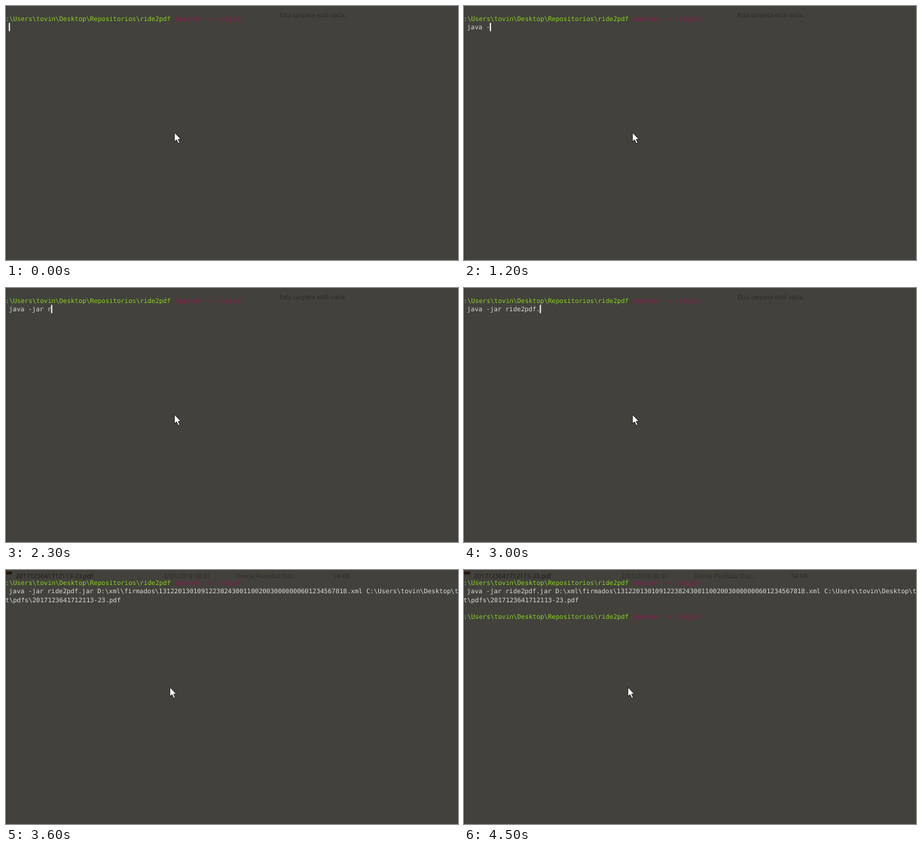
An HTML page for the animation above (4700 ms loop, 600 by 338 pixels).

```html
<!DOCTYPE html>
<html lang="es">
<head>
<meta charset="utf-8">
<style>
  html, body { margin: 0; width: 100%; height: 100%; overflow: hidden; background: #42413c; }
  svg { display: block; width: 600px; height: 338px; }
  text { white-space: pre; text-rendering: geometricPrecision; }
  .term { font: 8.47px "DejaVu Sans Mono", monospace; fill: #dcdcd6; }
  .term .path { fill: #8bd322; }
  .term .branch { fill: #8f1850; }
  .files { font: 8.25px "Open Sans", sans-serif; fill: #2b2a27; }
</style>
</head>
<body>
<svg viewBox="0 0 600 338">
  <rect width="600" height="338" fill="#42413c"/>
  <rect width="1" height="338" fill="#363530"/>
  <g class="files">
    <text id="empty" x="363" y="15.3">Esta carpeta está vacía.</text>
    <g id="row">
      <rect y="2" width="8" height="4" fill="#2a190f"/>
      <text x="13" y="10.6" fill="#1c1b19">2017123641712113-23.pdf</text>
      <text x="209" y="10.6">2/01/2018 00:31</text>
      <text x="305" y="10.6">Orena Plumdac Doc...</text>
      <text x="434" y="10.6">54 KB</text>
    </g>
  </g>
  <g class="term">
    <text id="prompt" x="-0.7" y="20"><tspan class="path">:\Users\tovin\Desktop\Repositorios\ride2pdf</tspan><tspan class="branch"> (master -> origin)</tspan></text>
    <text id="command" x="4" y="31.3"></text>
    <text id="wrapped" x="-0.7" y="42.6">t\pdfs\2017123641712113-23.pdf</text>
    <use id="nextPrompt" href="#prompt" y="45.2"/>
  </g>
  <rect id="caret" width="1.6" height="11" fill="#fff"/>
  <path id="mouse" d="M0 0V12.3L2.8 9.8L5 14.6L7.1 13.7L5 9.1H8.6Z" fill="#fff" stroke="#111" stroke-width=".8"/>
</svg>
<script>
  const LOOP = 4700, CHAR = 5.1;
  const COMMAND = "java -jar ride2pdf.jar D:\\xml\\firmados\\" +
    "1312201301091223824300110020030000000601234567818.xml C:\\Users\\tovin\\Desktop\\t";
  // [time in ms, characters typed so far]
  const TYPING = [[0, 0], [400, 1], [500, 2], [700, 3], [800, 4], [1000, 5], [1200, 6],
    [1600, 8], [1700, 9], [1900, 10], [2300, 11], [2400, 12], [2500, 13], [2700, 14],
    [3000, 19], [3200, COMMAND.length]];

  const $ = id => document.getElementById(id);
  const show = (id, on) => $(id).setAttribute("visibility", on ? "visible" : "hidden");
  const place = (id, x, y) => $(id).setAttribute("transform", `translate(${x} ${y})`);

  function draw(t) {
    const typed = TYPING.findLast(([at]) => at <= t)[1];
    const entered = t >= 3200, listed = t >= 3600, done = t >= 4000;
    $("command").textContent = COMMAND.slice(0, typed);
    show("wrapped", entered);
    show("empty", !listed);
    show("row", listed);
    show("nextPrompt", done);
    show("caret", t < 100 || (t >= 400 && !entered) || (done && t < 4500));
    place("caret", done ? 3.7 : 3.7 + typed * CHAR, done ? 67.6 : 22.5);
    place("mouse", entered ? 217.6 : 223.6, entered ? 156 : 168.3);
  }

  let start;
  function tick(now) {
    start ??= now;
    draw((now - start) % LOOP);
    requestAnimationFrame(tick);
  }
  draw(0);
  requestAnimationFrame(tick);
</script>
</body>
</html>
```
